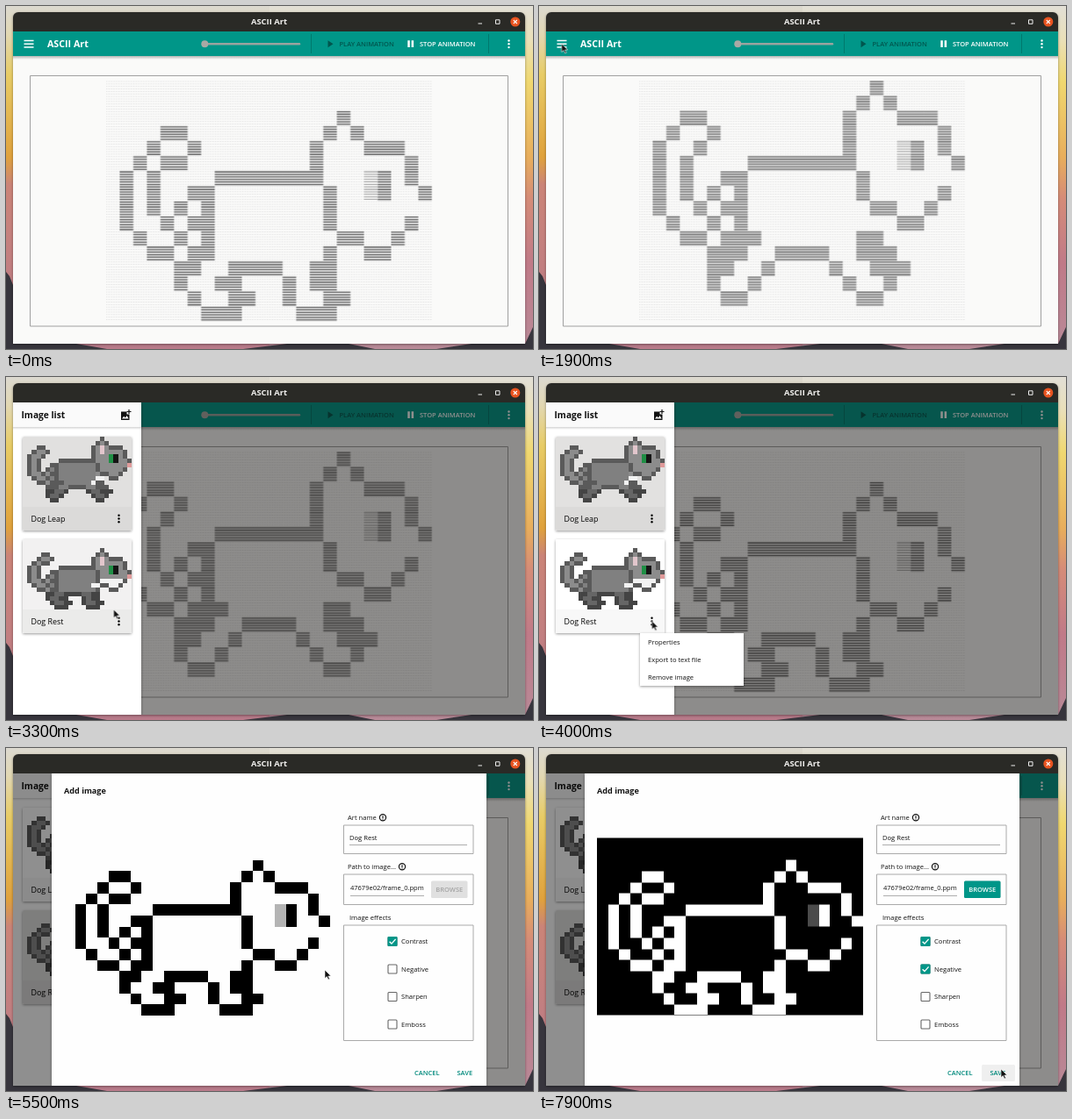
An HTML page for the animation above (8 s loop, 600x391 px).

```html
<!DOCTYPE html>
<html lang="en">
<head>
<meta charset="utf-8">
<title>ASCII Art</title>
<style>
html, body { margin: 0; width: 100%; height: 100%; overflow: hidden; }
svg { display: block; width: 600px; height: 391px; }
text { font: 7.6px Ubuntu, "Open Sans", "Noto Sans", sans-serif; fill: #111; }
.b { font-weight: 700; }
.m { font-weight: 600; font-size: 7.5px; }
.name { font-size: 8.9px; fill: #000; }
.pixels { shape-rendering: crispEdges; }
.box { fill: none; stroke: #aaa; }
.line { stroke: #999; stroke-width: .8; }

/* One percent is 80 ms. */
.anim { animation: 8s linear infinite; }
.step { animation: 8s step-end infinite; }
.jump { animation-name: jump; }
.stay { animation-name: stay; }
.hiJump { animation-name: hiJump; }
.hiStay { animation-name: hiStay; }
.dim { animation-name: dim; }
.drawer { animation-name: slide; }
.menu { animation-name: menu; }
.hover { animation-name: hover; }
.modal, .shade { animation-name: modal; }
.late { animation-name: late; }
.early { animation-name: early; }
.save { animation-name: save; }
.cursor { animation-name: cursor; animation-timing-function: ease-in-out; }

@keyframes jump {
  0%, 10.625%, 27.5%, 50%, 100% { opacity: 0; }
  1.25%, 20%, 40% { opacity: 1; }
}
@keyframes stay {
  0%, 10.625%, 27.5%, 50%, 100% { opacity: 1; }
  1.25%, 20%, 40% { opacity: 0; }
}
@keyframes hiJump {
  0%, 40%, 52%, 100% { opacity: 0; }
  41.25%, 50% { opacity: 1; }
}
@keyframes hiStay {
  0%, 40%, 52%, 100% { opacity: 1; }
  42.25%, 50% { opacity: 0; }
}
@keyframes dim {
  0%, 28.75% { opacity: 0; animation-timing-function: cubic-bezier(.22, .61, .36, 1); }
  32.25%, 100% { opacity: 1; }
}
@keyframes slide {
  0%, 28.75% { transform: translateX(-150px); animation-timing-function: cubic-bezier(.22, .61, .36, 1); }
  32.25%, 100% { transform: none; }
}
@keyframes menu { 0%, 60.6%, 100% { opacity: 0; } 46.25% { opacity: 1; } }
@keyframes hover { 0%, 100% { opacity: 0; } 53% { opacity: 1; } }
@keyframes modal { 0%, 60.6% { opacity: 0; } 63%, 100% { opacity: 1; } }
@keyframes late { 0% { opacity: 0; } 85%, 100% { opacity: 1; } }
@keyframes early { 0% { opacity: 1; } 85%, 100% { opacity: 0; } }
@keyframes save { 0% { opacity: 0; } 96.25%, 100% { opacity: 1; } }
@keyframes cursor {
  0%, 5% { transform: translate(602px, 392px); }
  15% { transform: translate(15px, 167px); }
  25% { transform: translate(26px, 39px); }
  28% { transform: translate(26px, 40px); }
  30% { transform: translate(29.5px, 48.5px); }
  34% { transform: translate(52px, 80px); }
  41.25% { transform: translate(122.5px, 265px); }
  45%, 49% { transform: translate(128px, 277px); }
  56%, 61.25% { transform: translate(140px, 303px); }
  68.75% { transform: translate(363px, 253px); }
  71.25% { transform: translate(407px, 245px); }
  77.5%, 85% { transform: translate(446px, 250px); }
  95% { transform: translate(526px, 362px); }
  98.75%, 100% { transform: translate(526px, 366px); }
}
</style>
</head>
<body>
<svg viewBox="0 0 600 391">
  <defs>
    <linearGradient id="skyL" x2="0" y2="1">
      <stop offset="0" stop-color="#dcd9d0"/><stop offset=".08" stop-color="#e2d8b4"/>
      <stop offset=".2" stop-color="#e8cc66"/><stop offset=".44" stop-color="#e0a23c"/>
      <stop offset=".52" stop-color="#cb8478"/><stop offset="1" stop-color="#b87a8a"/>
    </linearGradient>
    <linearGradient id="skyR" x2="0" y2="1">
      <stop offset="0" stop-color="#e2dfd6"/><stop offset=".1" stop-color="#eae0b8"/>
      <stop offset=".22" stop-color="#f0d870"/><stop offset=".44" stop-color="#e8ae5c"/>
      <stop offset=".56" stop-color="#d58c78"/><stop offset=".75" stop-color="#c07a88"/>
      <stop offset="1" stop-color="#b88a98"/>
    </linearGradient>
    <linearGradient id="fall" x2="0" y2="1">
      <stop offset="0" stop-color="#000" stop-opacity=".28"/><stop offset="1" stop-color="#000" stop-opacity="0"/>
    </linearGradient>
    <filter id="lift" x="-10%" y="-10%" width="120%" height="125%">
      <feDropShadow dx="0" dy="1" stdDeviation="1.4" flood-opacity=".4"/>
    </filter>
    <clipPath id="win"><path d="M8 29H591V385H8z"/></clipPath>
    <g id="dots"><circle r="1.2"/><circle cy="-3.8" r="1.2"/><circle cy="3.8" r="1.2"/></g>
    <g id="info"><circle r="3.6" fill="none" stroke="#111" stroke-width="1.2"/><path d="M0-2V.6M0 1.2v1" stroke="#111" stroke-width="1.1"/></g>
    <g id="tick"><rect x="-5.5" y="-5.5" width="11" height="11" rx="1" fill="#009688"/><path d="M-3.4.2-1 2.6 3.6-2.6" fill="none" stroke="#fff" stroke-width="1.4"/></g>
  </defs>

  <rect width="300" height="391" fill="url(#skyL)"/>
  <rect x="300" width="300" height="391" fill="url(#skyR)"/>
  <path d="M0 303 4 308 8 318V385H80L115 391H0zM270 391 320 385H390L420 391zM490 391 530 385H591L600 366V391z" fill="#37353d"/>

  <path d="M8 29V13a6 6 0 0 1 6-6H585a6 6 0 0 1 6 6V385H8z" fill="#2b2a28" filter="url(#lift)"/>
  <g clip-path="url(#win)">
    <path d="M8 29H591V385H8z" fill="#fafaf9"/>
    <path d="M8 29H591V57H8z" fill="#009688"/>
    <path d="M8 57H591V61H8z" fill="url(#fall)"/>
    <path d="M20.5 39.5h11M20.5 43.2h11M20.5 47h11" stroke="#fff" stroke-width="1.4"/>
    <text class="b" x="47" y="47" style="font-size:10.7px;fill:#fff">ASCII Art</text>
    <path d="M226 43.2H334" stroke="#9aa39f" stroke-width="2.4" stroke-linecap="round"/>
    <circle cx="226.3" cy="43.2" r="4" fill="#a9a9a5"/>
    <path d="M347.5 32V54M549.5 32V54" stroke="#00796d"/>
    <path d="M366.5 39.2v8l6-4z" fill="#00564e"/>
    <text class="m" x="379.5" y="46" style="fill:#00564e">PLAY ANIMATION</text>
    <path d="M457.3 39.3h2.5v7.8h-2.5zM461.6 39.3h2.5v7.8h-2.5z" fill="#fff"/>
    <text class="m" x="471" y="46" style="fill:#fff">STOP ANIMATION</text>
    <use href="#dots" x="572.5" y="43.3" fill="#fff"/>
    <path d="M27.5 79.5H571.5V365H27.5z" fill="#fafaf9" stroke="#a0a0a0"/>
    <path id="faint" stroke="#e6e6e6" stroke-width="1" stroke-dasharray="1 .55"/>
    <g id="artStay" class="step stay"/>
    <g id="artJump" class="step jump"/>
    <path class="anim dim" d="M8 29H591V385H8z" fill="#0e0c0a" fill-opacity=".46"/>

    <g class="anim drawer">
      <path d="M8 29H154V385H8z" fill="#fff" filter="url(#lift)"/>
      <path d="M8 29H154V57H8z" fill="#fafafa"/>
      <path d="M8 57H154V60H8z" fill="url(#fall)" opacity=".6"/>
      <text class="b" x="17.5" y="47" style="font-size:10.2px">Image list</text>
      <path d="M131 39.5h6.5v3h3V49H131z" fill="#111"/>
      <path d="m132 47.6 2.2-2.8 1.5 1.7 1.9-2.4 2 3.5z" fill="#fff"/>
      <path d="M140 37v5M137.5 39.5h5" stroke="#111" stroke-width="1.2"/>
      <g id="cards"/>
      <path class="anim shade" d="M8 29H154V385H8z" fill="#000" fill-opacity=".44"/>
    </g>

    <g class="step menu">
      <path d="M115 292H233V352H115z" fill="#fff" filter="url(#lift)"/>
      <path class="step hover" d="M115 293H233V312H115z" fill="#d0d0d0"/>
      <text x="124" y="305">Properties</text>
      <text x="124" y="325.3">Export to text file</text>
      <text x="124" y="345.3">Remove image</text>
    </g>

    <g class="anim modal">
      <path d="M52 29H547V385H52z" fill="#fefefe" filter="url(#lift)"/>
      <text class="b" x="66" y="52" style="font-size:9.1px">Add image</text>
      <g id="preview" class="pixels"/>

      <text x="389" y="82">Art name</text><use href="#info" x="429" y="79.3"/>
      <path class="box" d="M384.5 88H532V120.5H384.5z"/>
      <text x="391" y="104.8">Dog Rest</text>
      <path class="line" d="M391 110.5H525"/>

      <text x="389" y="138">Path to image...</text><use href="#info" x="451" y="135.3"/>
      <path class="box" d="M384.5 144H532V178.5H384.5z"/>
      <text x="392" y="161.8" style="font-size:7.5px">47679e02/frame_0.ppm</text>
      <path class="line" d="M392 168.5H476"/>
      <rect x="484" y="151.5" width="41.5" height="19.5" rx="1.5" fill="#e0e0e0"/>
      <rect class="step late" x="484" y="151.5" width="41.5" height="19.5" rx="1.5" fill="#009688"/>
      <text class="m step early" x="504.8" y="164" text-anchor="middle" style="fill:#a4a4a4">BROWSE</text>
      <text class="m step late" x="504.8" y="164" text-anchor="middle" style="fill:#fff">BROWSE</text>

      <text x="391" y="196.3">Image effects</text>
      <path class="box" d="M384.5 202H532V333.5H384.5z"/>
      <g id="effects"/>
      <use href="#tick" x="440" y="220.5"/>
      <use class="step late" href="#tick" x="440" y="252"/>

      <rect class="step save" x="504" y="361" width="38" height="19" rx="1.5" fill="#efefef"/>
      <text class="m" x="465" y="373" style="fill:#00897c">CANCEL</text>
      <text class="m" x="513.5" y="373" style="fill:#00897c">SAVE</text>
    </g>
  </g>

  <text class="b" x="299.5" y="21.4" text-anchor="middle" style="font-size:9.4px;fill:#f2f1ef">ASCII Art</text>
  <path d="M537.5 20h4.5M557.5 15.8h4.5v4.5h-4.5z" fill="none" stroke="#eee"/>
  <circle cx="579.8" cy="18" r="5.5" fill="#e95420"/>
  <path d="m577.8 16 4 4m0-4-4 4" stroke="#fff" stroke-width="1.1"/>
  <path class="anim cursor" d="M0 0v9.6l2.3-2 1.6 3.4 1.6-.7-1.6-3.3h3.1z" fill="#111" stroke="#fff" stroke-width=".6"/>
</svg>

<script>
const COLS = 24, ROWS = 16;
const $ = id => document.getElementById(id);

// Outlines as chains of straight or diagonal runs on the cell grid; top is the ear's row.
const poses = {
  Stay: { top: 2, chains: [
    "4,5 5,5 6,4 5,3 4,3 1,6 1,9 3,11 4,11 5,12 5,13 7,15 9,15 10,14 9,14 9,13 8,13 9,12 12,12 13,13 13,14 14,15 16,15 17,14 16,14 16,11 15,12 15,13",
    "3,6 3,8 6,11 6,12", "5,8 6,7 7,7 7,11", "6,9 7,9",
    "22,9 20,11 19,11 18,10 17,10 16,9 16,7 15,6 8,6",
    "15,6 15,4 17,2 19,4 21,4 22,5 22,6 23,7"] },
  Jump: { top: 0, chains: [
    "4,4 5,3 4,2 3,2 1,4 1,8 3,10 4,10 5,11 5,13 6,14 7,14 10,11 13,11 16,14 17,14 19,12 18,11 16,11 16,10 17,10",
    "3,5 3,7 6,10 8,10", "5,11 7,11", "5,12 6,12", "17,12 19,12", "5,7 6,6 7,6 7,10", "6,8 7,8",
    "22,7 20,9 19,9 18,8 17,8 16,7 16,6 15,5 8,5",
    "15,5 15,2 17,0 19,2 21,2 22,3 22,4 23,5"] }
};

const key = (x, y) => x + "," + y;
const split = k => k.split(",").map(Number);

function trace(chains) {
  const cells = new Set();
  for (const chain of chains) {
    const points = chain.split(" ").map(split);
    let [x, y] = points[0];
    for (const [px, py] of points) {
      while (x !== px || y !== py) {
        cells.add(key(x, y));
        x += Math.sign(px - x);
        y += Math.sign(py - y);
      }
      cells.add(key(x, y));
    }
  }
  return cells;
}

// Cells reachable from outside the grid.
function outside(walls) {
  const seen = new Set(), stack = [[-1, -1]];
  while (stack.length) {
    const [x, y] = stack.pop(), k = key(x, y);
    if (x < -1 || y < -1 || x > COLS || y > ROWS || seen.has(k) || walls.has(k)) continue;
    seen.add(k);
    stack.push([x + 1, y], [x - 1, y], [x, y + 1], [x, y - 1]);
  }
  return seen;
}

const rectPath = (x, y, w, h) => `M${x} ${y}h${w}v${h}h${-w}z`;
const blocks = cells => [...cells].map(k => rectPath(...split(k), 1, 1)).join("");
const stripes = (cells, h) => [...cells].map(k => {
  const [x, y] = split(k);
  return Array.from({ length: 6 }, (_, i) => rectPath(x, y + i / 6, 1, h)).join("");
}).join("");
const path = (d, fill) => `<path d="${d}" fill="${fill}"/>`;
const eye = (x, top) => [key(x, top + 4), key(x, top + 5)];

function fur(x, y, top) {
  if (x === 17 && (y === top + 2 || y === top + 3)) return "#e2c6cc";
  if (y > 11) return "#666";
  if (y > 8 && y < 11 && x + y > 24) return "#f2f2f2";
  return x > 15 || x < 6 ? "#8c8c8c" : "#808080";
}

function thumb({ cells, top }) {
  // Nose and chest close the gaps in the outline.
  const nose = key(23, top + 6), chest = key(17, 9);
  const air = outside(new Set([...cells, nose, chest]));
  let out = "";
  for (let y = 0; y < ROWS; y++) for (let x = 0; x < COLS; x++) {
    const k = key(x, y);
    if (air.has(k)) continue;
    const fill = k === nose ? "#e09a9a"
      : cells.has(k) ? (y > 11 ? "#444" : "#5a5a5a")
      : eye(19, top).includes(k) ? "#1f8f45"
      : eye(20, top).includes(k) ? "#151515" : fur(x, y, top);
    out += path(rectPath(x, y, 1, 1), fill);
  }
  return out;
}

function asciiArt({ cells, top }) {
  const dark = [...cells, ...eye(20, top)], pale = eye(19, top);
  return `<g transform="translate(114 85.5) scale(15.45 17.15)">`
    + path(blocks(dark), "#e6e6e6") + path(stripes(dark, .075), "#626262")
    + path(stripes(pale, .06), "#a2a2a2") + "</g>";
}

function card(pose, y, name, hi) {
  return `<g transform="translate(19 ${y})">
    <rect width="124" height="107" rx="1.5" fill="#fff" filter="url(#lift)"/>
    <path d="M0 80H124V107H0z" fill="#f8f8f8"/>
    <rect class="anim ${hi}" width="124" height="107" rx="1.5" fill="#1a1408" fill-opacity=".13"/>
    <g class="pixels" transform="scale(5.167 5)">${thumb(pose)}</g>
    <text class="name" x="9.5" y="96.5">${name}</text><use href="#dots" x="109.5" y="93.5"/></g>`;
}

function contrast({ cells, top }, paper, ink, mid, cls) {
  return `<g class="${cls}" transform="translate(66 102.5) scale(12.625 12.656)">`
    + path(rectPath(0, 0, COLS, ROWS), paper)
    + path(blocks([...cells, ...eye(20, top)]), ink) + path(blocks(eye(19, top)), mid) + "</g>";
}

for (const [name, pose] of Object.entries(poses)) {
  pose.cells = trace(pose.chains);
  $("art" + name).innerHTML = asciiArt(pose);
}
$("faint").setAttribute("d", Array.from({ length: 96 }, (_, i) => `M114 ${86 + i * 2.858}H485`).join(""));
$("cards").innerHTML = card(poses.Jump, 68, "Dog Leap", "hiJump") + card(poses.Stay, 185, "Dog Rest", "hiStay");
$("preview").innerHTML = contrast(poses.Stay, "#fefefe", "#000", "#b4b4b4", "")
  + contrast(poses.Stay, "#000", "#fff", "#4b4b4b", "step late");
$("effects").innerHTML = ["Contrast", "Negative", "Sharpen", "Emboss"].map((name, i) => {
  const y = 220.5 + i * 31.5;
  return `<rect x="435" y="${y - 5}" width="10" height="10" rx="1" fill="none" stroke="#666" stroke-width="1.1"/>
    <text x="450" y="${y + 2.8}">${name}</text>`;
}).join("");
</script>
</body>
</html>
```
